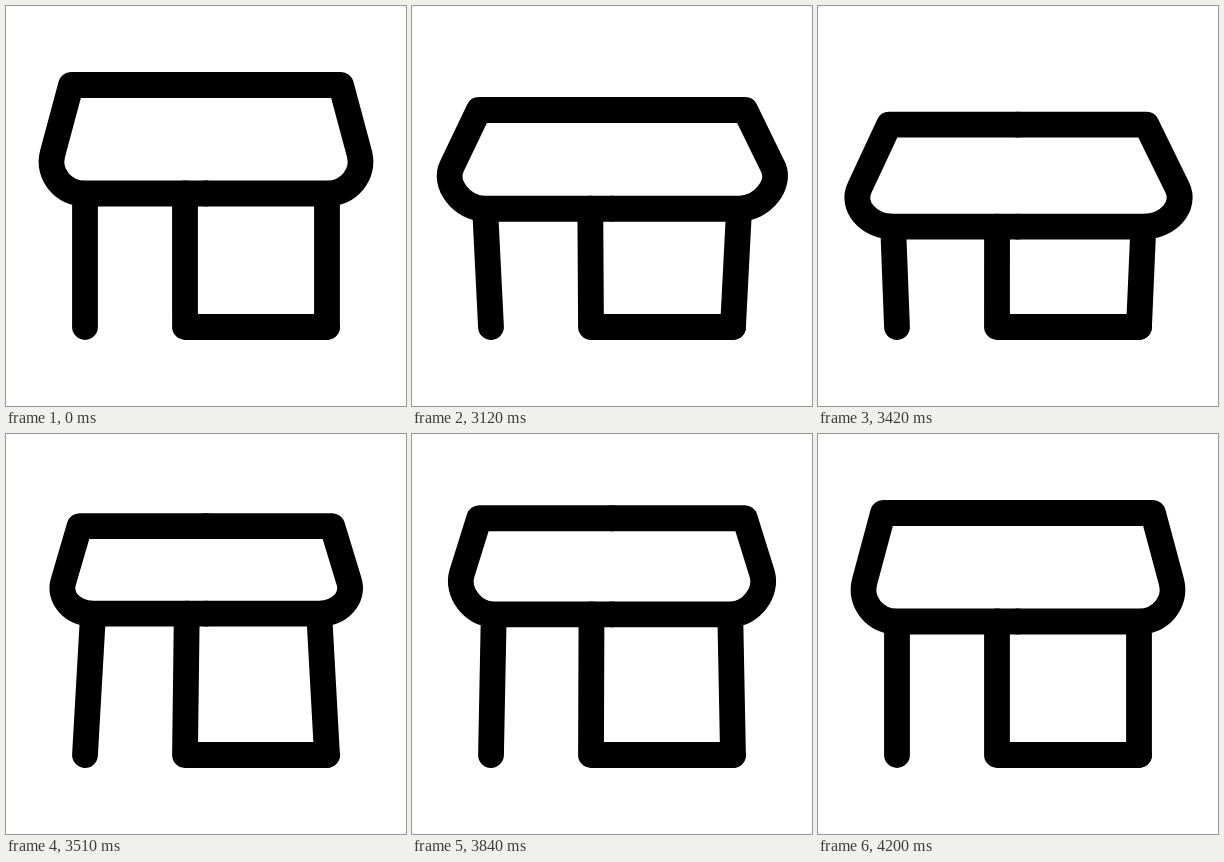
Animation, 400 px wide and 400 px high, one loop 4230 ms. Source, as an HTML page without scripts:

```html
<!DOCTYPE html>
<html lang="en">
<head>
<meta charset="utf-8">
<title>Bouncing shop</title>
<style>
  html, body { margin: 0; width: 100%; height: 100%; overflow: hidden; background: #fff; }
  svg { display: block; width: 100%; height: 100%; }
  path {
    fill: none; stroke: #000; stroke-width: 25.8;
    stroke-linecap: round; stroke-linejoin: round;
    animation: 4230ms infinite cubic-bezier(.33, 0, .67, 1);
  }
  .left { animation-name: left; }
  .right { animation-name: right; }
  .window { animation-name: window; }

  /* rest, squash, lift, stretch, settle, rest */
  @keyframes left {
    0%, 71.28%, 99.29%, 100% { d: path("M200,79H65L46.5,148C41.3,168.5 57.5,187.5 79,187.5H200M79,187.5L79,321"); }
    76.95% { d: path("M200,139.6H69.4L30.5,177.8C16.2,191 39.3,224.4 64.7,224.4H200M64.7,224.4L79,321"); animation-timing-function: cubic-bezier(.4, 0, .67, .45); }
    80.85% { d: path("M200,119H71L41.5,182C32.5,200 50,221 75,221H200M75,221L79,321"); animation-timing-function: cubic-bezier(.33, .43, .6, 1); }
    86.52% { d: path("M200,69H75.8L71,118C69.5,132 80,144 97.4,144H200M97.4,144L79,321"); }
    92.67% { d: path("M200,88.6H64.7L43.8,146C37.4,165 54.7,190.8 77.3,190.8H200M77.3,190.8L79,321"); }
  }
  /* mirrored half, slightly wider while squashed */
  @keyframes right {
    0%, 71.28%, 99.29%, 100% { d: path("M200,79H65L46.5,148C41.3,168.5 57.5,187.5 79,187.5H200M79,187.5L79,321"); }
    76.95% { d: path("M200,139.6H69.4L29,177.8C14.4,191 38,224.4 64.3,224.4H200M64.3,224.4L79,321"); animation-timing-function: cubic-bezier(.4, 0, .67, .45); }
    80.85% { d: path("M200,119H71.5L40.5,182C31.5,200 49,221 74.5,221H200M74.5,221L79,321"); animation-timing-function: cubic-bezier(.33, .43, .6, 1); }
    86.52% { d: path("M200,69H75.8L71,118C69.5,132 80,144 97.4,144H200M97.4,144L79,321"); }
    92.67% { d: path("M200,88.6H64.7L43.8,146C37.4,165 54.7,190.8 77.3,190.8H200M77.3,190.8L79,321"); }
  }
  @keyframes window {
    0%, 71.28%, 99.29%, 100% { d: path("M179,187.5L179,321H321"); }
    76.95% { d: path("M177.3,224.4L179,321H321"); animation-timing-function: cubic-bezier(.4, 0, .67, .45); }
    80.85% { d: path("M179,221L179,321H321"); animation-timing-function: cubic-bezier(.33, .43, .6, 1); }
    86.52% { d: path("M182.3,144L179,321H321"); }
    92.67% { d: path("M178.7,190.8L179,321H321"); }
  }
</style>
</head>
<body>
<svg viewBox="0 0 400 400">
  <path class="left" d="M200,79H65L46.5,148C41.3,168.5 57.5,187.5 79,187.5H200M79,187.5L79,321"/>
  <path class="right" transform="matrix(-1 0 0 1 400 0)" d="M200,79H65L46.5,148C41.3,168.5 57.5,187.5 79,187.5H200M79,187.5L79,321"/>
  <path class="window" d="M179,187.5L179,321H321"/>
</svg>
</body>
</html>
```
